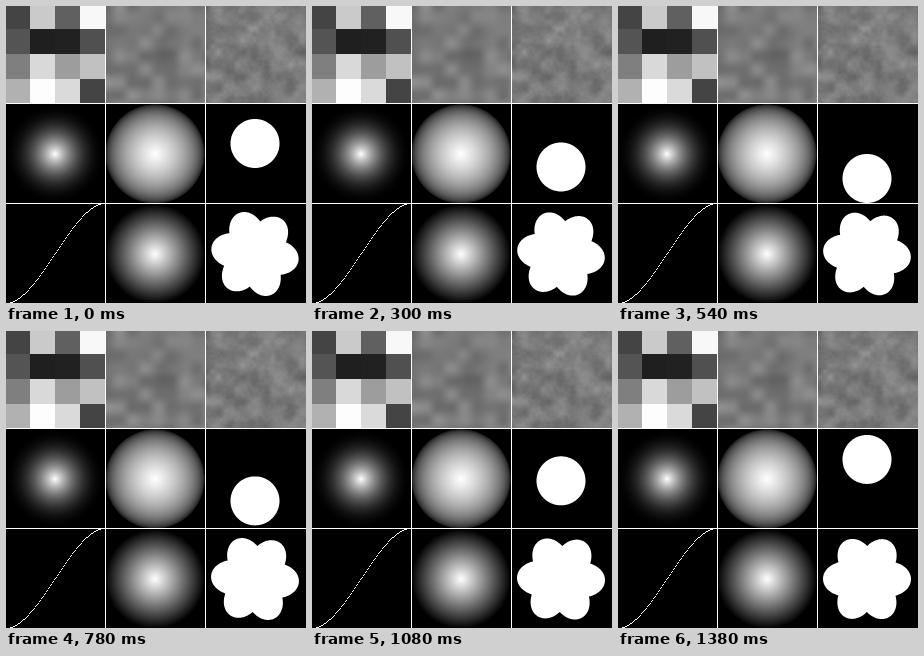
An HTML page with a canvas for the animation above (1560 ms loop, 300 by 297 pixels).

```html
<!DOCTYPE html>
<html lang="en">
<head>
<meta charset="utf-8">
<title>Shaping functions</title>
<style>
  html, body { margin: 0; width: 100%; height: 100%; overflow: hidden; background: #000; }
  canvas { display: block; width: 300px; height: 297px; }
</style>
</head>
<body>
<canvas id="stage" width="300" height="297"></canvas>
<script>
const W = 300, H = 297, TILE = 100, TOP = -2;
const LOOP = 1560, STEP = 60, LAST = 23;
const ctx = document.getElementById('stage').getContext('2d');

const smooth = t => t * t * (3 - 2 * t);
const mix = (a, b, t) => a + (b - a) * t;

function hash(x, y) {
  const s = Math.sin(x * 12.9898 + y * 78.233) * 43758.5453;
  return s - Math.floor(s);
}

// Value noise around zero
function noise(x, y) {
  const i = Math.floor(x), j = Math.floor(y);
  const u = smooth(x - i), v = smooth(y - j);
  return mix(
    mix(hash(i, j), hash(i + 1, j), u),
    mix(hash(i, j + 1), hash(i + 1, j + 1), u), v) - 0.5;
}

function fbm(x, y, size, octaves) {
  let sum = 0;
  for (let n = 0, amp = 1; n < octaves; n++, amp /= 2, size /= 2) {
    sum += amp * noise(x / size + n * 17, y / size + n * 31);
  }
  return sum;
}

// Gray levels of the 4 x 4 mosaic, row by row
const grays = [
  68, 202, 96, 248, 84, 31, 33, 80,
  127, 217, 157, 193, 177, 253, 218, 68
];

const mosaic = (x, y) => grays[Math.floor(y / 25) * 4 + Math.floor((x + 1) / 25) % 4];
const cloud = (x, y) => 125 + 38 * noise(x / 13, y / 13)
  - 26 * Math.exp(-(((x - 62) / 14) ** 2) - ((y - 38) / 20) ** 2);
const grain = (x, y) => 123 + 34 * fbm(x, y, 12, 4);
const glow = power => (x, y) =>
  255 * Math.max(0, 1 - Math.hypot(x - 48.5, y - 49.5) / 49.8) ** power;
const curve = (x, y) => Math.round(100 * smooth((x + 1) / 100)) === 99 - y ? 255 : 0;
const black = () => 0;

const tiles = [
  [mosaic, cloud, grain],
  [glow(2), glow(0.5), black],
  [curve, glow(1), black]
];

function paintTiles() {
  const img = ctx.createImageData(W, H);
  for (let y = 0; y < H; y++) {
    for (let x = 0; x < W; x++) {
      const tx = x % TILE, ty = (y - TOP) % TILE;
      const line = ty === 99 || (tx === 99 && x < W - 1);
      const tile = tiles[Math.floor((y - TOP) / TILE)][Math.floor(x / TILE)];
      const p = (y * W + x) * 4;
      img.data.fill(line ? 255 : tile(tx, ty), p, p + 3);
      img.data[p + 3] = 255;
    }
  }
  ctx.putImageData(img, 0, 0);
}

// Fills a closed polar shape
function blob(cx, cy, radius, turn = 0) {
  ctx.beginPath();
  for (let deg = 0; deg < 360; deg++) {
    const a = deg * Math.PI / 180, r = radius(a);
    ctx.lineTo(cx + r * Math.cos(a + turn), cy + r * Math.sin(a + turn));
  }
  ctx.fill();
}

const round = () => 24.5;
const petals = a => 33 + 11 * Math.abs(Math.cos(3 * a));

function draw(time) {
  const k = Math.min(LAST, Math.floor((time % LOOP) / STEP));
  ctx.fillStyle = '#000';
  ctx.fillRect(200, 98, 100, 99);
  ctx.fillRect(200, 198, 100, 99);

  ctx.fillStyle = '#fff';
  blob(249, 148.3 + 25 * Math.cos(0.196 * (k - 10.3)), round);
  blob(249, 248, petals, (9 - 0.38 * k) * Math.PI / 180);
  ctx.fillRect(200, 197, 100, 1);
}

paintTiles();
const start = performance.now();
function tick() {
  draw(performance.now() - start);
  requestAnimationFrame(tick);
}
tick();
</script>
</body>
</html>
```
